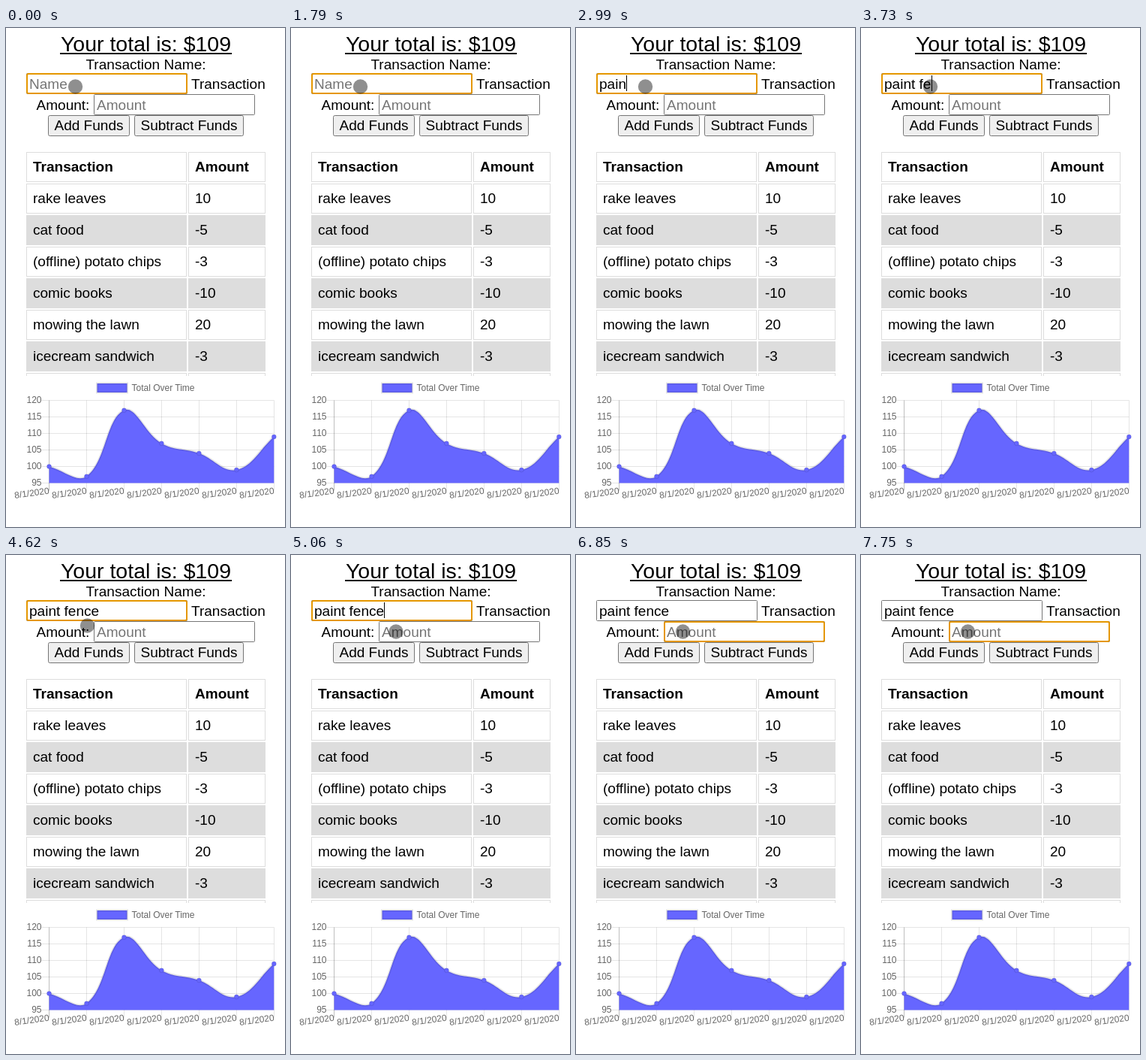
An HTML page for the animation above (8 s loop, 372 px wide and 664 px high).

```html
<!DOCTYPE html>
<html lang="en">
<head>
<meta charset="utf-8">
<title>Budget tracker</title>
<style>
  html, body { margin: 0; width: 100%; height: 100%; overflow: hidden; background: #fff; }
  svg { display: block; width: 372px; height: 664px; font: 19.05px "Liberation Sans", Arial, sans-serif; }
  .title { font-size: 28.5px; }
  .hint { fill: #757575; }
  .box { fill: #fff; stroke: #767676; }
  .button { fill: #efefef; stroke: #767676; }
  .ring { fill: none; stroke: #e59700; stroke-width: 2; }
  .cell { fill: #fff; stroke: #ddd; }
  .shaded { fill: #ddd; }
  .head { font-weight: bold; }
  .mid { text-anchor: middle; }
  .end { text-anchor: end; }
  #chart { font-size: 12px; }
  #chart text { fill: #666; }
  .grid { stroke: rgba(0, 0, 0, .1); }
  .axis { stroke: rgba(0, 0, 0, .25); }
  .area, .dot, .key { fill: #66f; }
  .dot { stroke: rgba(0, 0, 0, .1); }
  .line { fill: none; }
  .line, .key { stroke: rgba(0, 0, 0, .1); stroke-width: 3; }
  #touch { fill: rgba(0, 0, 0, .44); }
</style>
</head>
<body>
<svg viewBox="0 0 372 664">
  <defs><clipPath id="scroll"><rect y="160" width="372" height="303"/></clipPath></defs>

  <text class="title mid" x="186.5" y="31">Your total is: $109</text>
  <rect x="72" y="33" width="229" height="2"/>
  <text class="mid" x="186.5" y="55">Transaction Name:</text>

  <rect class="box" x="27.5" y="60.5" width="214" height="27" rx="1"/>
  <text class="hint" id="nameHint" x="31" y="80.5">Name</text>
  <text id="typed" x="31" y="80.5"></text>
  <text x="247" y="80.5">Transaction</text>

  <text x="40.5" y="108.5">Amount:</text>
  <rect class="box" x="117.5" y="88.5" width="214" height="27" rx="1"/>
  <text class="hint" x="121" y="108.5">Amount</text>

  <rect class="ring" id="ring" x="28" y="61" width="213" height="26" rx="2"/>
  <rect id="caret" y="63" width="1" height="21"/>

  <rect class="button" x="56.5" y="116.5" width="108" height="27" rx="2"/>
  <text class="mid" x="110.5" y="136">Add Funds</text>
  <rect class="button" x="171.5" y="116.5" width="145" height="27" rx="2"/>
  <text class="mid" x="244" y="136">Subtract Funds</text>

  <g id="table" clip-path="url(#scroll)"></g>
  <g id="chart"></g>
  <circle id="touch" r="9.7"/>
</svg>
<script>
const $ = id => document.getElementById(id);

function add(parent, tag, attrs, text) {
  const el = document.createElementNS('http://www.w3.org/2000/svg', tag);
  for (const key in attrs) el.setAttribute(key, attrs[key]);
  if (text !== undefined) el.textContent = text;
  return parent.appendChild(el);
}

function drawTable() {
  const rows = [
    ['Transaction', 'Amount'], ['rake leaves', 10], ['cat food', -5],
    ['(offline) potato chips', -3], ['comic books', -10],
    ['mowing the lawn', 20], ['icecream sandwich', -3], ['', '']
  ];
  const columns = [{ x: 27, width: 214 }, { x: 243, width: 103 }];
  rows.forEach((row, i) => columns.forEach(({ x, width }, c) => {
    const y = 165 + 42 * i;
    const shaded = i && i % 2 === 0;
    add($('table'), 'rect', {
      class: shaded ? 'cell shaded' : 'cell',
      x: x + .5, y: y + .5, width: width - 1, height: 39
    });
    add($('table'), 'text', { class: i ? '' : 'head', x: x + 9, y: y + 26 }, row[c]);
  }));
}

function drawChart() {
  const chart = $('chart');
  const left = 57.5, right = 357.3, top = 495.5, bottom = 605.5;
  const totals = [100, 97, 117, 107, 104, 99, 109];
  const xAt = i => left + (right - left) * i / (totals.length - 1);
  const yAt = v => bottom - (v - 95) * (bottom - top) / 25;
  const line = (x1, y1, x2, y2, cls) => add(chart, 'line', { class: cls, x1, y1, x2, y2 });

  add(chart, 'rect', { class: 'key', x: 121.5, y: 473, width: 40, height: 12 });
  add(chart, 'text', { x: 167.5, y: 483 }, 'Total Over Time');

  for (let v = 95; v <= 120; v += 5) {
    const y = Math.floor(yAt(v)) + .5;
    line(left - 10, y, right, y, 'grid');
    add(chart, 'text', { class: 'end', x: left - 10, y: y + 3.8 }, v);
  }
  totals.forEach((_, i) => {
    const x = Math.floor(xAt(i)) + .5;
    line(x, top, x, bottom + 10, i ? 'grid' : 'axis');
    add(chart, 'text', {
      class: 'end', y: 4.2, transform: `translate(${x} 615.3) rotate(-8)`
    }, '8/1/2020');
  });

  // Smooth curve whose handles follow the neighbours and stay inside the plot.
  const points = totals.map((v, i) => ({ x: xAt(i), y: yAt(v) }));
  const clampY = y => Math.min(bottom, Math.max(top, y));
  const clampX = x => Math.min(right, Math.max(left, x));
  const handles = points.map((p, i) => {
    const a = points[i - 1] || p, b = points[i + 1] || p;
    const da = Math.hypot(p.x - a.x, p.y - a.y), db = Math.hypot(b.x - p.x, b.y - p.y);
    const handle = k => `${clampX(p.x + k * (b.x - a.x))} ${clampY(p.y + k * (b.y - a.y))}`;
    return { before: handle(-.4 * da / (da + db)), after: handle(.4 * db / (da + db)) };
  });
  const curve = points.map((p, i) => i
    ? `C${handles[i - 1].after} ${handles[i].before} ${p.x} ${p.y}`
    : `M${p.x} ${p.y}`).join('');
  add(chart, 'path', { class: 'area', d: `${curve}V${bottom}H${left}Z` });
  add(chart, 'path', { class: 'line', d: curve });
  points.forEach(p => add(chart, 'circle', { class: 'dot', cx: p.x, cy: p.y, r: 3 }));
}

const LOOP = 8000, FOCUS_AMOUNT = 5350;
const phrase = 'paint fence';
// Each entry: start time, value held until the next one.
const letters = [
  [0, 0], [2390, 1], [2690, 2], [2990, 4], [3130, 5], [3430, 6],
  [3580, 7], [3730, 8], [3880, 9], [4020, 10], [4170, 11]
];
const moves = [
  [0, [92.5, 78]], [4620, [108.5, 94]], [4760, [124, 99]],
  [4910, [134, 101.5]], [5050, [140, 102]], [5200, [142.5, 102]]
];
const blinks = [300, 740, 1190, 1790, 2240, 4620, 5050, 5800, 6250, 6850, 7300, 7750];
const held = (steps, t) => steps.filter(([start]) => start <= t).pop()[1];

function render(t) {
  const count = held(letters, t);
  const [cx, cy] = held(moves, t);
  const onAmount = t >= FOCUS_AMOUNT;
  const typed = $('typed');

  typed.textContent = phrase.slice(0, count);
  $('nameHint').style.display = count ? 'none' : '';
  $('ring').setAttribute('transform', onAmount ? 'translate(90 28)' : '');

  // A trailing space has no measured width, so measure it through its neighbour.
  const width = !count ? 0 : count === 6
    ? caretWidths[6] : caretWidths[count];
  $('caret').setAttribute('x', onAmount ? 121 : Math.round(31.3 + width));
  $('caret').setAttribute('y', onAmount ? 92 : 63 + (count ? 0 : 1));
  $('caret').style.display = blinks.filter(b => b <= t).length % 2 ? '' : 'none';

  $('touch').setAttribute('cx', cx);
  $('touch').setAttribute('cy', cy);
}

function measure() {
  const typed = $('typed');
  typed.textContent = phrase;
  return Array.from({ length: phrase.length + 1 },
    (_, n) => n ? typed.getSubStringLength(0, n) : 0);
}

drawTable();
drawChart();
const caretWidths = measure();
const begin = performance.now();
function tick() {
  render((performance.now() - begin) % LOOP);
  requestAnimationFrame(tick);
}
tick();
</script>
</body>
</html>
```
